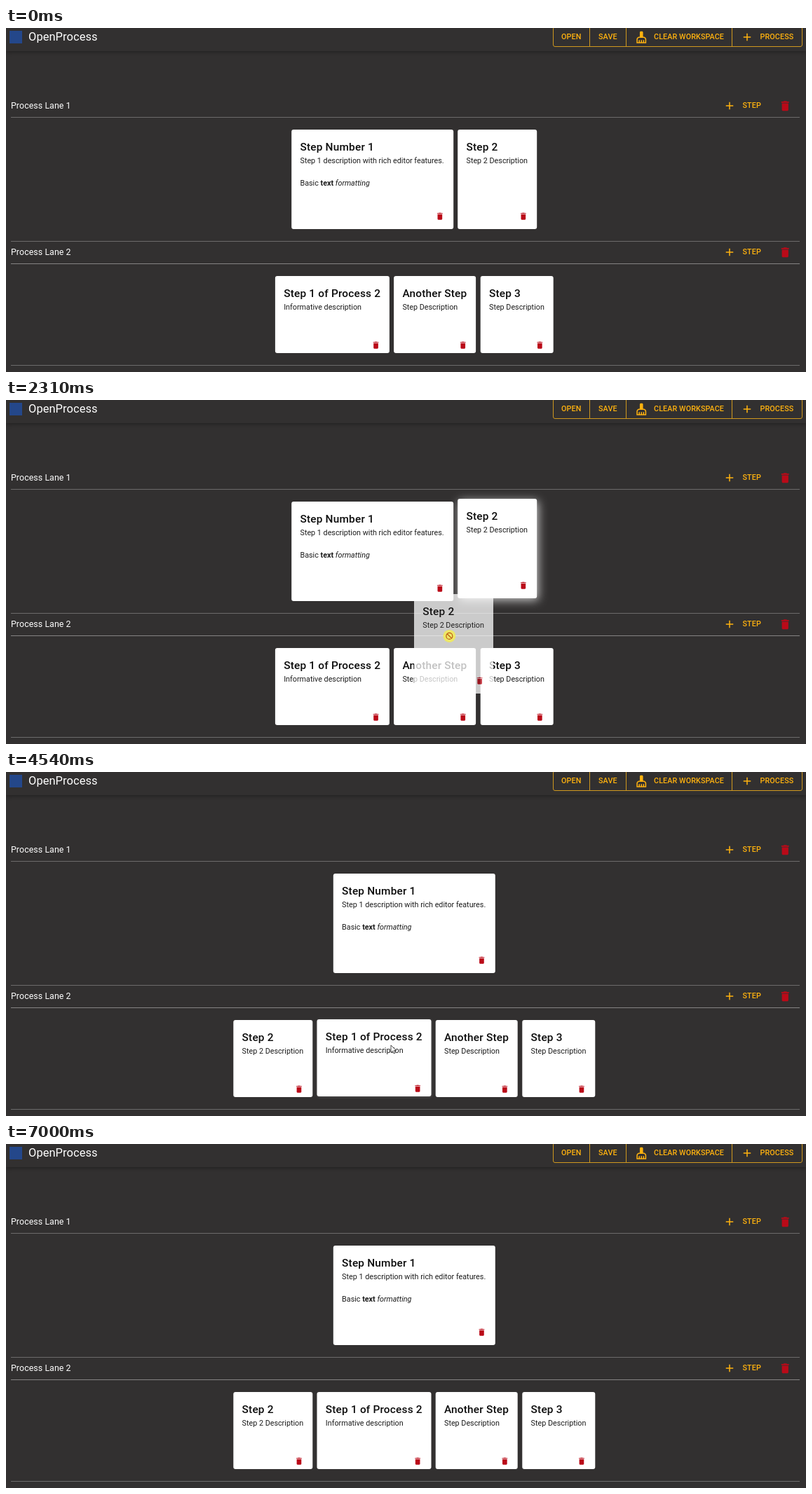
An HTML page that plays this animation: 1141 px wide and 491 px high, repeating every 7460 ms.

```html
<!DOCTYPE html>
<html lang="en">
<head>
<meta charset="utf-8">
<title>OpenProcess</title>
<style>
  html, body { margin: 0; width: 100%; height: 100%; overflow: hidden; background: #323030; }
  #stage { position: relative; width: 1141px; height: 491px; overflow: hidden; color: #fff; font-family: Roboto, sans-serif; }
  #stage *, #stage svg { position: absolute; box-sizing: border-box; margin: 0; white-space: nowrap; }
  #stage p b, #stage p i { position: static; }
  header { left: 0; top: 0; width: 1141px; height: 33px; box-shadow: 0 2px 5px rgba(0,0,0,.3); }
  .logo { left: 5px; top: 4px; width: 18px; height: 18px; background: #24478a; }
  h1 { left: 32px; top: 3px; font: 400 16.4px/20px Roboto, sans-serif; letter-spacing: .1px; }
  .group { left: 780px; top: -2px; width: 356px; height: 29px; border: 1px solid #cf981f; border-radius: 3px; }
  .bar { top: 0; width: 1px; height: 27px; background: #cf981f; }
  .label { font: 500 10.78px/20px Roboto, sans-serif; letter-spacing: .1px; color: #ffb20f; }
  svg { overflow: visible; }
  .amber { fill: #ffb20f; }
  .red { fill: #ba0a18; }
  .name { left: 7px; top: 101px; font-size: 12.32px; line-height: 20px; letter-spacing: .1px; }
  .line { left: 7px; width: 1125px; height: 1px; background: #6c6b6b; }
  .zone { left: 7px; width: 1126px; border: 1px dashed; }
  .card { background: #fff; border-radius: 3px; color: #1c1c1c; }
  .card h3 { left: 12.3px; top: 15px; font: 500 15.4px/20px Roboto, sans-serif; letter-spacing: .19px; color: #0c0c0c; }
  .card p { left: 12.3px; top: 37px; font-size: 10.78px; line-height: 16px; }
  .card svg { right: 12.3px; }
  #ghost { opacity: .75; }
  #press { left: -9px; top: -9px; width: 18px; height: 18px; border-radius: 50%; background: #f6ee4c; opacity: .78; }
</style>
</head>
<body>
<div id="stage"></div>
<script>
const LOOP = 7460, GRAB = 1360, DROP = 4200, FADE = 200, LIFT = 4;
const CENTER = 582.2, GAP = 6.2;
const stage = document.getElementById('stage');

const shapes = {
  trash: 'M6 19c0 1.1.9 2 2 2h8c1.1 0 2-.9 2-2V7H6zM19 4h-3.5l-1-1h-5l-1 1H5v2h14z',
  plus: 'M19 13h-6v6h-2v-6H5v-2h6V5h2v6h6z',
  broom: 'M16 11h-1V3c0-1.1-.9-2-2-2h-2c-1.1 0-2 .9-2 2v8H8c-2.76 0-5 2.24-5 5v7h18v-7c0-2.76-2.24-5-5-5zm3 10h-2v-3c0-.55-.45-1-1-1s-1 .45-1 1v3h-2v-3c0-.55-.45-1-1-1s-1 .45-1 1v3H9v-3c0-.55-.45-1-1-1s-1 .45-1 1v3H5v-5c0-1.65 1.35-3 3-3h8c1.65 0 3 1.35 3 3z'
};
const icon = (name, color, size, style) =>
  `<svg class="${color}" viewBox="0 0 24 24" width="${size}" height="${size}" style="${style}"><path d="${shapes[name]}"/></svg>`;
const iconAt = (name, color, size, x, y) =>
  icon(name, color, size, `left:${x - size / 2}px;top:${y - size / 2}px`);
const label = (text, x, y) => `<span class="label" style="left:${x}px;top:${y - 10}px">${text}</span>`;

function add(parent, tag, cls, html = '', css = '') {
  const el = document.createElement(tag);
  el.className = cls;
  el.innerHTML = html;
  el.style.cssText = css;
  return parent.appendChild(el);
}
const show = (el, on) => el.style.display = on ? '' : 'none';
const moveTo = (el, x, y) => el.style.transform = `translate(${x}px,${y}px)`;

add(stage, 'header', '', `<div class="logo"></div><h1>OpenProcess</h1><div class="group">
  ${[51, 103, 254].map(x => `<i class="bar" style="left:${x}px"></i>`).join('')}</div>` +
  label('OPEN', 792, 13) + label('SAVE', 845, 13) + label('CLEAR WORKSPACE', 924, 13) + label('PROCESS', 1075.5, 13) +
  iconAt('broom', 'amber', 18.5, 906, 13) + iconAt('plus', 'amber', 18, 1057, 13));

// Lanes: a head, a drop zone with cards, and a line below
const lanes = [
  { name: 'Process Lane 1', head: 0, top: 145, height: 142, foot: 304, zone: [138, 157], dash: '#0c0c0c', trash: 11.3, line: '#6c6b6b' },
  { name: 'Process Lane 2', head: 209, top: 354, height: 110, foot: 481, zone: [347, 124], dash: '#b08d2a', trash: 4.6, line: '#858484' }
];
for (const l of lanes) {
  l.headEl = add(stage, 'div', '', `<span class="name">${l.name}</span>` + label('STEP', 1050.5, 111) +
    iconAt('plus', 'amber', 18, 1032, 111) + iconAt('trash', 'red', 18.5, 1111, 111) +
    `<div class="line" style="top:127px;background:${l.line}"></div>`, `top:${l.head}px`);
  l.footEl = add(stage, 'div', 'line', '', `top:${l.foot}px`);
  l.zoneEl = add(stage, 'div', 'zone', '', `top:${l.zone[0]}px;height:${l.zone[1]}px;border-color:${l.dash}`);
  l.bodyEl = add(stage, 'div', '', '', `top:${l.top}px`);
}

function addCard(parent, lane, title, text, width) {
  return add(parent, 'div', 'card', `<h3>${title}</h3><p>${text}</p>` +
    icon('trash', 'red', 13.3, `bottom:${lane.trash}px`), `width:${width}px;height:${lane.height}px`);
}

const cards = [
  { lane: 0, title: 'Step Number 1', text: 'Step 1 description with rich editor features.<br><br>Basic <b>text</b> <i>formatting</i>', width: 230.8, hovers: [] },
  { lane: 0, title: 'Step 2', text: 'Step 2 Description', width: 113, until: DROP, hovers: [[880, DROP]] },
  { lane: 1, title: 'Step 2', text: 'Step 2 Description', width: 113, from: DROP, hovers: [[5000, 5770]] },
  { lane: 1, title: 'Step 1 of Process 2', text: 'Informative description', width: 163, hovers: [[4490, 5000], [5770, 5900]] },
  { lane: 1, title: 'Another Step', text: 'Step Description', width: 117.4, hovers: [[5905, 6034]] },
  { lane: 1, title: 'Step 3', text: 'Step Description', width: 103.8, hovers: [[6040, 6152]] }
];
for (const c of cards) c.el = addCard(lanes[c.lane].bodyEl, lanes[c.lane], c.title, c.text, c.width);

const ghost = addCard(stage, lanes[0], 'Step 2', 'Step 2 Description', 113);
ghost.id = 'ghost';

const pointer = add(stage, 'div', '', `<div id="press"></div>
  <svg id="arrow" width="10" height="14"><path d="M0 0V10.5L2.5 8.2 4.2 12 6 11.2 4.4 7.6H7.6Z" fill="#fff" stroke="#222" stroke-width=".8"/></svg>
  <svg id="hand" width="12" height="14"><path d="M-1 8V1.2q1-1.4 2 0V5l5 1q1.5.4 1.3 2L6.6 11 6 13H0L-3.6 8.4q0-1.5 1.4-.9Z" fill="#fff" stroke="#222" stroke-width=".9"/></svg>
  <svg id="deny" width="10" height="10"><path d="M-4.5 0A4.5 4.5 0 1 0 4.5 0 4.5 4.5 0 1 0-4.5 0M-3.2-3.2 3.2 3.2" fill="none" stroke="#bd570e" stroke-width="1.2"/></svg>`);
const [press, arrow, hand, deny] = ['press', 'arrow', 'hand', 'deny'].map(id => document.getElementById(id));

// Keys: time, x, y
const path = [
  [390, 1105, 462], [700, 890, 330], [980, 705, 212], [1090, 694, 202], [GRAB, 694, 202],
  [1890, 671, 296], [2100, 655, 325], [2170, 655, 325], [2500, 602, 353], [2860, 556, 387],
  [2920, 556, 387], [2990, 552, 389], [3060, 549, 389.5], [4760, 549, 390], [5050, 420, 415],
  [5490, 385, 425], [5690, 385, 425], [5820, 531, 402], [6380, 1050, 425], [6450, 1050, 425], [6800, 1128, 432]
];
const grip = [[1890, 50, 61], [2990, 51, 58], [3930, 52, 59]];
const zoneTimes = [[0, 1830, 1960], [1, 2400, 2520], [1, 3050, DROP]];

const clamp = v => Math.max(0, Math.min(1, v));
const within = (t, a, b) => t >= a && t < b;

function along(keys, t) {
  const next = keys.findIndex(k => k[0] > t);
  const i = next < 0 ? keys.length - 1 : Math.max(1, next);
  const [a, b] = [keys[i - 1], keys[i]];
  const f = clamp((t - a[0]) / (b[0] - a[0]));
  return [a[1] + (b[1] - a[1]) * f, a[2] + (b[2] - a[2]) * f];
}

// The border of an active zone pushes its surroundings one pixel apart
function layoutLanes(active) {
  const [first, second] = lanes;
  const on = active >= 0, mid = active === 0 ? 1 : active === 1 ? -1 : 0;
  moveTo(first.headEl, 0, on ? -1 : 0);
  moveTo(first.bodyEl, 0, active === 1 ? -1 : 0);
  moveTo(first.footEl, 0, mid);
  moveTo(second.headEl, 0, mid);
  moveTo(second.bodyEl, 0, active === 0 ? 1 : 0);
  moveTo(second.footEl, 0, on ? 1 : 0);
  lanes.forEach((l, i) => show(l.zoneEl, i === active));
}

// Each row of cards is centred
function layoutCards(t) {
  const present = c => within(t, c.from ?? 0, c.until ?? LOOP);
  const left = lanes.map((_, i) => {
    const row = cards.filter(c => c.lane === i && present(c));
    return CENTER - (row.reduce((sum, c) => sum + c.width + GAP, -GAP)) / 2;
  });
  for (const c of cards) {
    show(c.el, present(c));
    if (!present(c)) continue;
    const lift = Math.max(0, ...c.hovers.map(([a, b]) =>
      clamp((Math.min(t, b) - a) / FADE) * clamp(1 - (t - b) / FADE)));
    moveTo(c.el, left[c.lane], -Math.round(LIFT * lift));
    c.el.style.boxShadow = lift ? `${2 * lift}px ${3 * lift}px ${14 * lift}px rgba(215,215,215,${.9 * lift})` : '';
    left[c.lane] += c.width + GAP;
  }
}

function draw(t) {
  const zone = zoneTimes.find(([, a, b]) => within(t, a, b));
  const active = zone ? zone[0] : -1;
  layoutLanes(active);
  layoutCards(t);

  const [x, y] = along(path, t);
  const [dx, dy] = along(grip, t);
  const dragging = within(t, GRAB, DROP);
  const denied = dragging && active !== 1;
  const pointing = within(t, 880, GRAB) || within(t, 4560, 6152);
  moveTo(ghost, Math.round(x - dx), Math.round(y - dy));
  moveTo(pointer, x, y);
  show(ghost, dragging);
  show(pointer, within(t, 390, 6800));
  show(press, dragging);
  show(deny, denied);
  show(hand, pointing);
  show(arrow, !denied && !pointing);
}

const start = performance.now();
function tick() {
  draw((performance.now() - start) % LOOP);
  requestAnimationFrame(tick);
}
tick();
</script>
</body>
</html>
```
